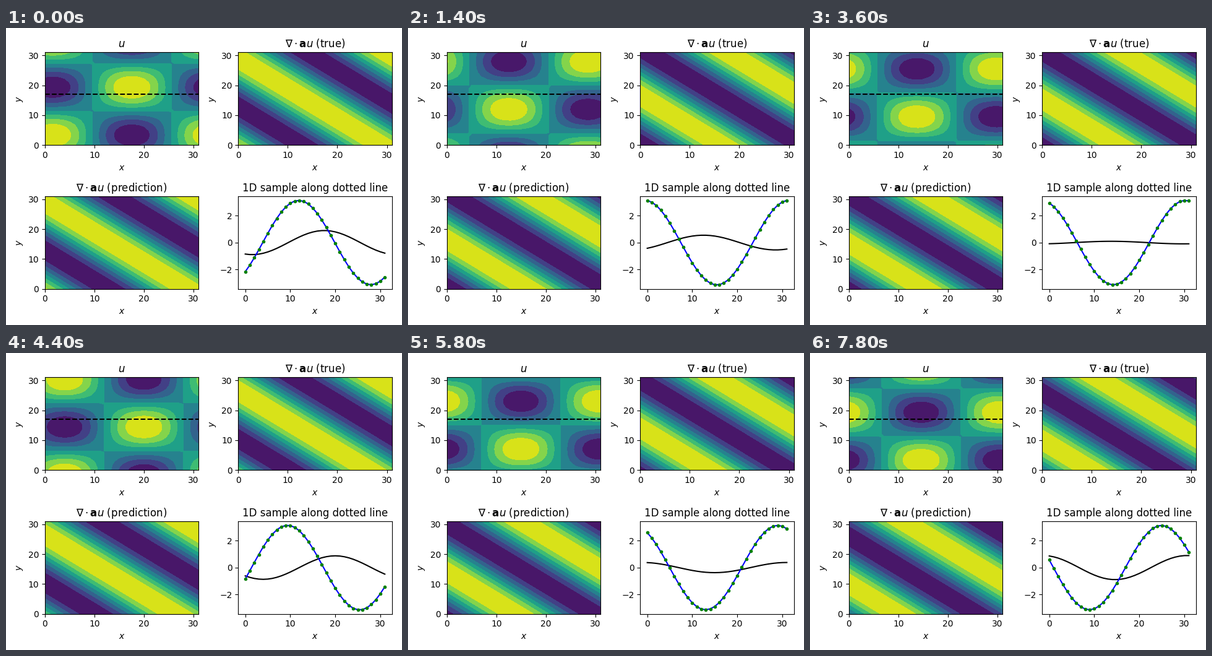
A matplotlib script for the animation above (8 s loop, 640x480 px).

```python
import numpy as np
import matplotlib.pyplot as plt
from matplotlib.animation import FuncAnimation

N = 32                    # grid points per period
ROW = 17                  # row sampled in the line plot
FRAMES, STEP = 40, 200    # frame count, ms per frame
START = (17.55, 19.33)    # position of a crest in grid units
DRIFT = (1.5652, 16 / 13)  # crest motion per frame

U_LEVELS = np.linspace(-1, 1, 9)
DIV_LEVELS = np.linspace(-3.2, 3.2, 9)

grid = np.arange(N)
X, Y = np.meshgrid(grid, grid)


def fields(i):
    """Standing product wave u and its divergence with a = (1, 1)."""
    px, py = (2 * np.pi / N * (g - s - d * i)
              for g, s, d in zip((X, Y), START, DRIFT))
    return np.cos(px) * np.cos(py), -np.pi * np.sin(px + py)


fig, axes = plt.subplots(2, 2, figsize=(6.4, 4.8), dpi=100)
ax_u, ax_true, ax_pred, ax_line = axes.flat


def label(ax, title, ylabel=None):
    ax.set_title(title)
    ax.set_xlabel("$x$")
    if ylabel:
        ax.set_ylabel(ylabel)


def draw(i):
    u, div = fields(i)
    for ax in axes.flat:
        ax.clear()

    ax_u.contourf(u, levels=U_LEVELS)
    ax_u.axhline(ROW, color="k", linestyle="--")
    label(ax_u, "$u$", "$y$")

    for ax, kind in ((ax_true, "true"), (ax_pred, "prediction")):
        ax.contourf(div, levels=DIV_LEVELS)
        label(ax, rf"$\nabla \cdot \mathbf{{a}}u$ ({kind})", "$y$")

    ax_line.plot(grid, u[ROW], "k")
    ax_line.plot(grid, div[ROW], "b")
    ax_line.plot(grid, div[ROW], "g.")
    label(ax_line, "1D sample along dotted line")
    return []


draw(0)
fig.tight_layout()
anim = FuncAnimation(fig, draw, frames=FRAMES, interval=STEP,
                     init_func=lambda: [], repeat=True, repeat_delay=0)
plt.show()
```
